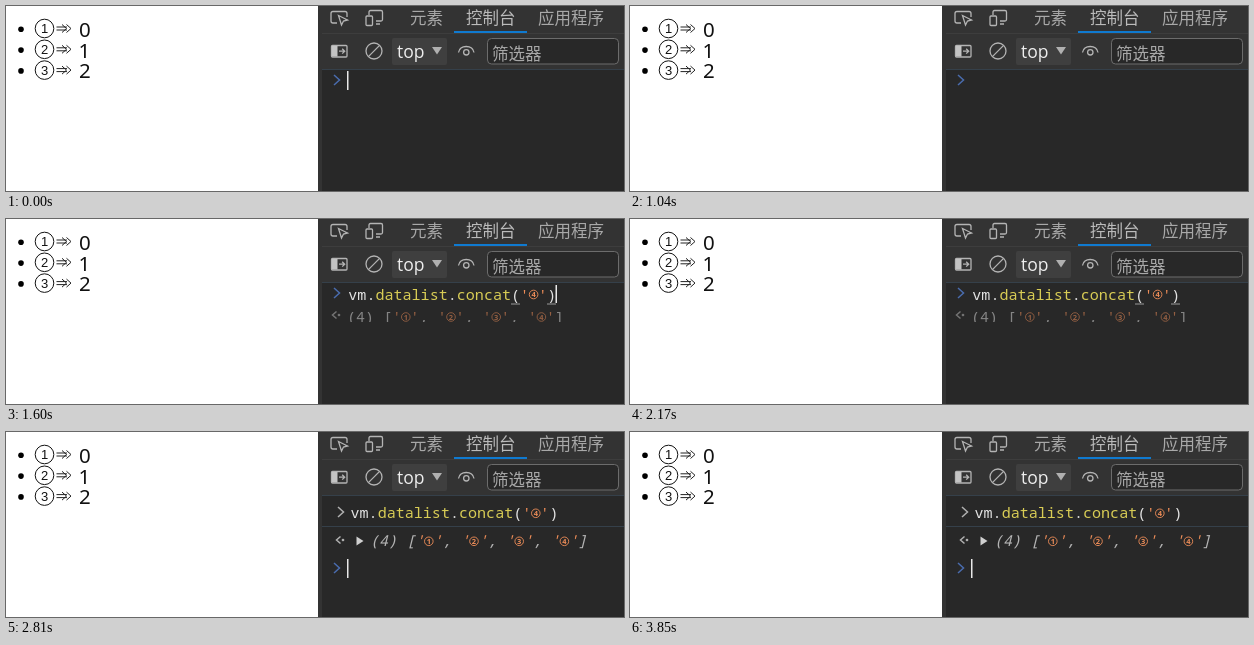
An HTML page that plays this animation: 618x185 px, repeating every 4.25 s.

```html
<!DOCTYPE html>
<html lang="zh">
<head>
<meta charset="utf-8">
<title>Console concat</title>
<style>
html, body { margin: 0; width: 100%; height: 100%; overflow: hidden; background: #fff; }
svg { display: block; }
text { white-space: pre; }
.list text { font: 20.5px "Noto Sans", sans-serif; fill: #111; }
.list .digit, .ring text { text-anchor: middle; }
.list .digit { font: 13px "Liberation Sans", sans-serif; }
.ui { font: 16.5px "Noto Sans CJK SC", "Noto Sans CJK", sans-serif; fill: #a8a8a8; }
.icon { fill: none; stroke: #b4b4b4; stroke-width: 1.3; }
.code, .result { font: 500 15.07px "Noto Sans Mono", monospace; }
.code { fill: #e3e3e3; }
.result { font-style: inherit; }
.prop { fill: #d8cc55; }
.str { fill: #ee8d58; }
.ring circle { fill: none; stroke: #ee8d58; stroke-width: .9; }
.ring text { font: bold 7.5px "Noto Sans", sans-serif; fill: #ee8d58; }
.chev { fill: none; stroke: #4a6cae; stroke-width: 1.5; }
.grey { stroke: #b0b0b0; }
.rule { stroke: #35404a; }
.caret { fill: #e8e8e8; }
.preview { opacity: .55; }
.output { font-style: italic; fill: #b4b4b4; }

.before, .typed, .preview, .after, .caret { animation: 4250ms step-end infinite; }
.before { animation-name: before; }
.typed { animation-name: typed; }
.preview { animation-name: preview; }
.after { animation-name: after; }
.c1 { animation-name: c1; }
.c2 { animation-name: c2; }
.c3 { animation-name: c3; }
@keyframes before { 0% { visibility: visible } 56.705%, 100% { visibility: hidden } }
@keyframes typed { 0%, 56.705%, 100% { visibility: hidden } 35.764% { visibility: visible } }
@keyframes preview { 0%, 56.705%, 100% { visibility: hidden } 37.647% { visibility: visible } }
@keyframes after { 0% { visibility: hidden } 56.705%, 100% { visibility: visible } }
@keyframes c1 { 0%, 11.294% { visibility: visible } 7.529%, 24.47%, 100% { visibility: hidden } }
@keyframes c2 { 0%, 51.058%, 100% { visibility: hidden } 35.764% { visibility: visible } }
@keyframes c3 { 0%, 79.294% { visibility: hidden } 66.117%, 90.588%, 100% { visibility: visible } }
</style>
</head>
<body>
<svg width="618" height="185" viewBox="0 0 618 185">
  <defs>
    <g id="item">
      <circle cx="15" cy="23.3" r="2.8"/>
      <circle cx="38.5" cy="22.5" r="9.3" fill="none" stroke="#111"/>
      <path d="M50.500 21H61M50.500 24H61M56 18.500L60.500 22.500L56 26.500M60.500 18.500L65 22.500L60.500 26.500" fill="none" stroke="#222"/>
    </g>
    <g id="call">
      <text class="code">vm.<tspan class="prop">datalist</tspan>.<tspan class="prop">concat</tspan>(<tspan class="str">' '</tspan>)</text>
      <g class="ring" transform="translate(185.3 -5)"><circle r="4.3"/><text y="2.7">4</text></g>
    </g>
    <g id="result">
      <text class="result">(4) [<tspan class="str">' '</tspan>, <tspan class="str">' '</tspan>, <tspan class="str">' '</tspan>, <tspan class="str">' '</tspan>]</text>
      <g class="ring" transform="translate(58.8 -5)"><circle r="4.3"/><text y="2.7">1</text></g>
      <g class="ring" transform="translate(104 -5)"><circle r="4.3"/><text y="2.7">2</text></g>
      <g class="ring" transform="translate(149.2 -5)"><circle r="4.3"/><text y="2.7">3</text></g>
      <g class="ring" transform="translate(194.4 -5)"><circle r="4.3"/><text y="2.7">4</text></g>
    </g>
    <path id="chev" d="M0 0L5.5 5L0 10"/>
    <g id="back"><path d="M4.5 -3.5L.5 0L4.5 3.5"/><circle cx="7" r=".6"/></g>
    <clipPath id="cut"><path d="M313 86H618V103H313Z"/></clipPath>
  </defs>

  <rect width="618" height="185" fill="#fff"/>
  <g class="list">
    <use href="#item"/>
    <use href="#item" y="20.8"/>
    <use href="#item" y="41.6"/>
    <text class="digit" x="38.5" y="27.2">1</text><text x="73" y="30.7">0</text>
    <text class="digit" x="38.5" y="48">2</text><text x="72.5" y="51.5">1</text>
    <text class="digit" x="38.5" y="68.8">3</text><text x="73" y="72.3">2</text>
  </g>

  <rect x="312" width="306" height="185" fill="#282828"/>
  <rect x="312" width="306" height="63" fill="#333"/>
  <rect x="312" width="4" height="185" fill="#333"/>
  <path d="M316 27.5H618" stroke="#3d3d3d"/>
  <path class="rule" d="M316 63.5H618"/>
  <rect x="448" y="25" width="73" height="2" fill="#0f7ad0"/>
  <g class="ui">
    <text x="404" y="17.5">元素</text>
    <text x="460" y="17.5" fill="#bbb">控制台</text>
    <text x="532" y="17.5">应用程序</text>
  </g>

  <g class="icon">
    <path d="M331 17H327Q325 17 325 15V7.500Q325 5.500 327 5.500H339Q341 5.500 341 7.500V11"/>
    <path d="M332.500 9.500L341.500 14L337.500 15L335.500 19Z"/>
    <path d="M363 9V6Q363 4.500 364.500 4.500H375Q376.500 4.500 376.500 6V13.500Q376.500 15 375 15H370M370 18H374"/>
    <rect x="360" y="10" width="6.500" height="9.500" rx="1"/>
    <rect x="325.500" y="39.500" width="15.500" height="11.500" rx="1"/>
    <rect x="326" y="40" width="5.500" height="10.500" fill="#c4c4c4" stroke="none"/>
    <path d="M333 45.200H338.500M336.200 42.800L338.700 45.200L336.200 47.600"/>
    <circle cx="368" cy="45" r="8"/><path d="M373.600 39.400L362.400 50.600"/>
    <path d="M452.500 46.500C454 38.500 466.500 38.500 468 46.500"/><circle cx="460.300" cy="46.300" r="2.700"/>
  </g>
  <rect x="386" y="32" width="55" height="27" rx="2" fill="#3f3f3f"/>
  <text x="391" y="52.3" fill="#eee" style="font:17.5px 'Open Sans',sans-serif">top</text>
  <path d="M426 41H436L431 48.500Z" fill="#b0b0b0"/>
  <rect x="481.500" y="32.500" width="131" height="25.500" rx="4" fill="#282828" stroke="#6c6c6c"/>
  <text class="ui" x="486" y="53.5">筛选器</text>

  <g class="before">
    <use href="#chev" class="chev" x="328" y="69"/>
  </g>
  <rect class="caret c1" x="341" y="65" width="1.5" height="19"/>
  <g class="typed">
    <use href="#call" x="342.3" y="80.5"/>
    <path d="M505 85H514M541 85H550" stroke="#999"/>
  </g>
  <rect class="caret c2" x="549.500" y="66" width="1.5" height="18"/>
  <g class="preview" clip-path="url(#cut)">
    <use href="#back" class="chev grey" x="326" y="96"/>
    <use href="#result" x="341" y="103" fill="#d0d0d0"/>
  </g>

  <g class="after">
    <path class="rule" d="M316 94.500H618"/>
    <use href="#chev" class="chev grey" x="332" y="75"/>
    <use href="#call" x="344.5" y="86.3"/>
    <use href="#back" class="chev grey" x="330" y="108"/>
    <path d="M350.500 104.500L357.500 109L350.500 113.500Z" fill="#d0d0d0"/>
    <use href="#result" class="output" x="364" y="114.3"/>
    <use href="#chev" class="chev" x="328" y="131"/>
  </g>
  <rect class="caret c3" x="341" y="127" width="1.5" height="19"/>
</svg>
</body>
</html>
```
